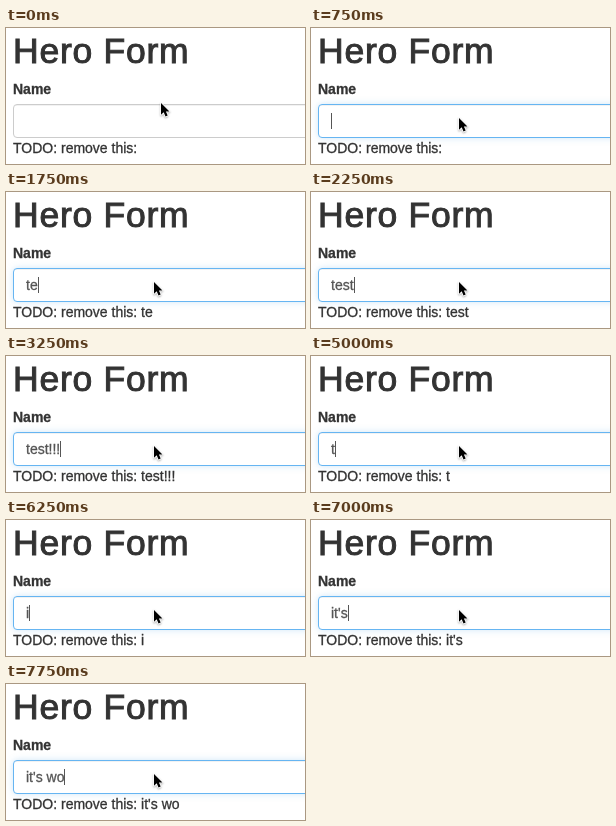
An HTML page with a canvas for the animation above (8 s loop, 299 by 136 pixels).

```html
<!DOCTYPE html>
<html lang="en">
<head>
<meta charset="utf-8">
<title>Hero Form</title>
<style>
html, body { margin: 0; width: 100%; height: 100%; overflow: hidden; background: #fff; }
canvas { display: block; width: 299px; height: 136px; }
</style>
</head>
<body>
<canvas id="stage"></canvas>
<script>
const W = 299, H = 136, LOOP = 8000;
const FONT = '"Liberation Sans", Arial, sans-serif';
const canvas = document.getElementById('stage');
const ctx = canvas.getContext('2d');
const dpr = window.devicePixelRatio || 1;
canvas.width = Math.round(W * dpr);
canvas.height = Math.round(H * dpr);

// [start ms, typed value]
const typed = [
  [0, ''], [1250, 't'], [1750, 'te'], [2000, 'tes'], [2250, 'test'],
  [2750, 'test!'], [3000, 'test!!'], [3250, 'test!!!'],
  [4000, 'test!!'], [4250, 'test!'], [4500, 'tes'], [4750, 'te'],
  [5000, 't'], [5250, ''], [6250, 'i'], [6500, 'it'], [6750, "it'"],
  [7000, "it's"], [7500, "it's "], [7750, "it's wo"]
];
const blinks = [[3750, 4000], [5750, 6250]];
const arrow = [[0, 0], [0, 11.8], [2.7, 9.3], [4.5, 13.6], [6.7, 12.6], [4.9, 8.5], [8.5, 8.5]];

// The thin stroke gives the slightly heavier look of smoothed screen type.
function text(str, x, y, font, color, weight = 0.3) {
  ctx.font = font + ' ' + FONT;
  ctx.fillStyle = ctx.strokeStyle = color;
  ctx.lineWidth = weight;
  ctx.lineJoin = 'miter';
  ctx.miterLimit = 2;
  ctx.fillText(str, x, y);
  ctx.strokeText(str, x, y);
}

function heading() {
  ctx.letterSpacing = '0.75px';
  text('Hero Form', 7, 35, '35.5px', '#333', 1);
  ctx.letterSpacing = '0px';
}

function field(focused) {
  const box = new Path2D();
  box.roundRect(7.5, 76.5, 400, 33, 3.5);
  ctx.save();
  if (focused) {
    ctx.shadowColor = 'rgba(102,175,233,0.35)';
    ctx.shadowBlur = 7 * dpr;
  }
  ctx.fillStyle = '#fff';
  ctx.fill(box);
  ctx.restore();
  ctx.fillStyle = 'rgba(0,0,0,0.05)';
  ctx.fillRect(9, 77, W, 1);
  ctx.strokeStyle = focused ? '#66b5f2' : '#ccc';
  ctx.lineWidth = 1;
  ctx.stroke(box);
}

function pointer(x, y) {
  ctx.save();
  ctx.translate(x, y);
  ctx.beginPath();
  arrow.forEach(([px, py]) => ctx.lineTo(px, py));
  ctx.closePath();
  ctx.lineJoin = 'round';
  ctx.shadowColor = 'rgba(0,0,0,0.3)';
  ctx.shadowBlur = 2 * dpr;
  ctx.shadowOffsetY = dpr;
  ctx.strokeStyle = '#fff';
  ctx.lineWidth = 1.6;
  ctx.stroke();
  ctx.shadowColor = 'transparent';
  ctx.fillStyle = '#000';
  ctx.fill();
  ctx.restore();
}

function draw(t) {
  const value = typed.filter(([at]) => at <= t).pop()[1];
  const focused = t >= 750;
  const caret = focused && !blinks.some(([a, b]) => t >= a && t < b);

  ctx.setTransform(dpr, 0, 0, dpr, 0, 0);
  ctx.fillStyle = '#fff';
  ctx.fillRect(0, 0, W, H);

  field(focused);
  heading();
  text('Name', 7, 66, 'bold 14px', '#333');
  text('TODO: remove this: ' + value, 7, 125, '14px', '#333');
  text(value, 20, 98, '14px', '#555');

  if (caret) {
    const x = Math.round(20 + ctx.measureText(value).width);
    ctx.fillStyle = '#555';
    ctx.fillRect(x, 85, 1, 16);
  }
  if (t < 250) pointer(155, 75);
  else pointer(148, 90);
}

const start = performance.now();
function tick() {
  draw((performance.now() - start) % LOOP);
  requestAnimationFrame(tick);
}
tick();
</script>
</body>
</html>
```
